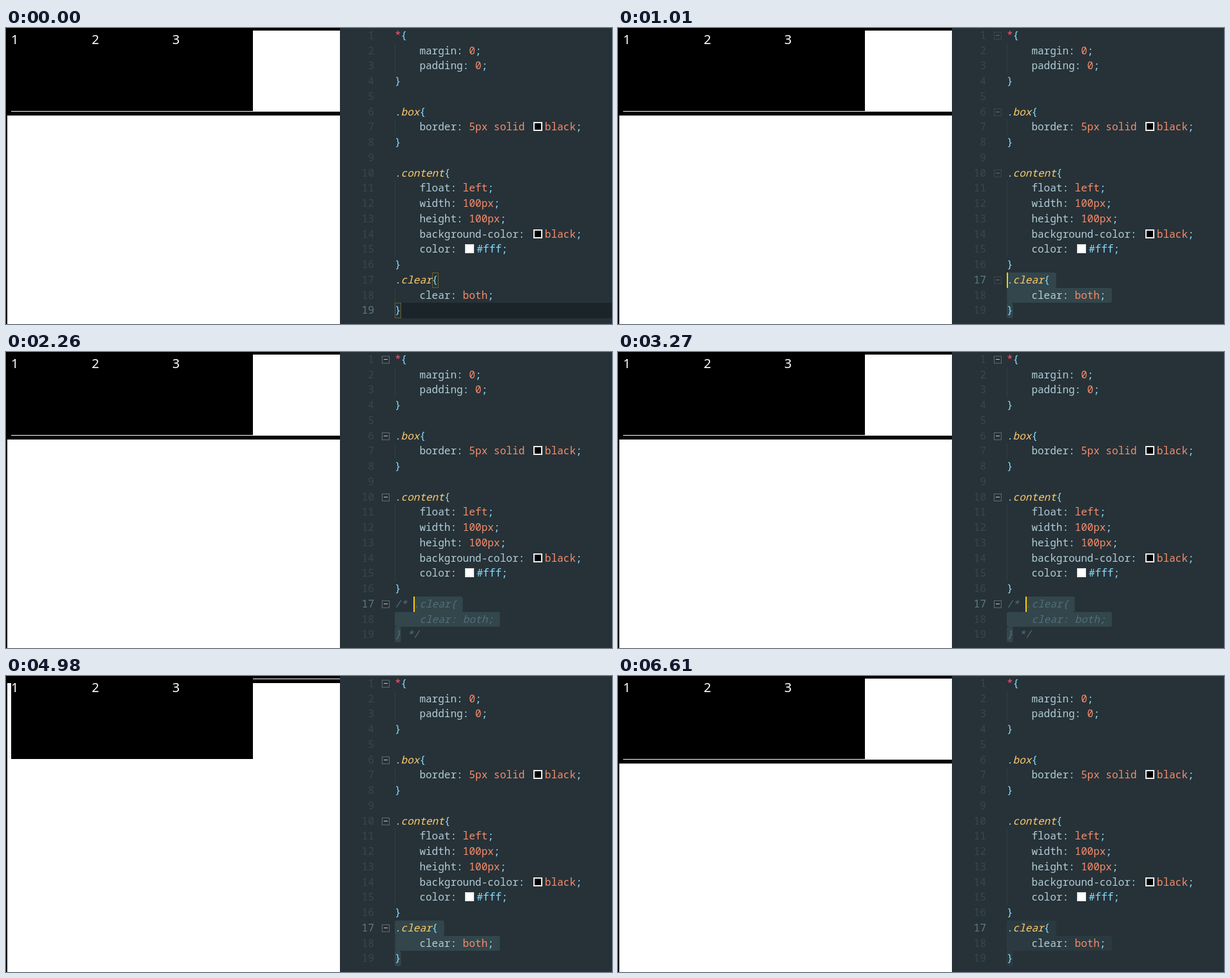
An HTML page with a canvas for the animation above (6750 ms loop, 940 by 460 pixels).

```html
<!DOCTYPE html>
<html lang="en">
<head>
<meta charset="utf-8">
<title>Clearing floats</title>
<style>
  html, body { margin: 0; width: 100%; height: 100%; overflow: hidden; background: #fff; }
  canvas { display: block; }
</style>
</head>
<body>
<canvas id="stage" width="940" height="460"></canvas>
<script>
const ctx = document.getElementById('stage').getContext('2d', { alpha: false });
const LOOP = 6750, LEFT = 603, CHAR = 9.6;
const MONO = '16px "Noto Sans Mono", "DejaVu Sans Mono", monospace';
const C = {
  bg: '#263238', punct: '#89ddff', star: '#ff5370', name: '#ffcb6b', prop: '#b2ccd6',
  value: '#f78c6c', comment: '#546e7a', num: '#37474f', active: '#607a86'
};
const HEAD = `*{
    margin: 0;
    padding: 0;
}

.box{
    border: 5px solid black;
}

.content{
    float: left;
    width: 100px;
    height: 100px;
    background-color: black;
    color: #fff;
}`.split('\n');
const RULE = ['.clear{', '    clear: both;', '}'];
const COMMENTED = ['/* .clear{', RULE[1], '} */'];

const rowY = row => Math.round(row * 23.74);
const colX = col => LEFT + col * CHAR;
const between = (t, a, b) => t >= a && t < b;

function rect(color, x, y, w, h) {
  ctx.fillStyle = color;
  ctx.fillRect(x, y, w, h);
}

function text(str, x, y, color, italic) {
  ctx.font = (italic ? 'italic ' : '') + MONO;
  ctx.fillStyle = color;
  ctx.fillText(str, x, y);
  return x + str.length * CHAR;
}

function swatch(x, row, color) {
  const y = rowY(row) + 4;
  rect('#eee', Math.round(x + 3.6), y, 14, 14);
  rect(color, Math.round(x + 3.6) + 2, y + 2, 10, 10);
  return x + 21.6;
}

function codeLine(line, row, isComment) {
  const y = rowY(row) + 17;
  if (isComment) return text(line, LEFT, y, C.comment, true);

  const selector = line.match(/^([*.])(\w*)\{/);
  if (selector) {
    const [, mark, name] = selector;
    let x = text(mark, LEFT, y, mark === '*' ? C.star : C.punct, mark === '.');
    x = text(name, x, y, C.name, true);
    return text('{', x, y, C.punct);
  }

  const rule = line.match(/^    (.+): (.+);/);
  if (!rule) return text(line, LEFT, y, C.punct);
  rect('#303d44', LEFT, rowY(row), 1, rowY(row + 1) - rowY(row));
  let x = text(rule[1], colX(4), y, C.prop);
  x = text(': ', x, y, C.punct);
  for (const part of rule[2].split(/(black|#fff)/)) {
    const isColor = part === 'black' || part === '#fff';
    if (isColor) x = swatch(x, row, part);
    x = text(part, x, y, part === '#fff' ? C.punct : C.value);
  }
  text(';', x, y, C.punct);
}

// Each range is [row, first column, last column].
function selection(ranges, alpha) {
  ctx.fillStyle = `rgba(128,203,196,${alpha})`;
  ctx.beginPath();
  for (const [row, from, to] of ranges) {
    ctx.roundRect(colX(from), rowY(row), (to - from) * CHAR, rowY(row + 1) - rowY(row), 3);
  }
  ctx.fill();
}

function bracketBox(row, col) {
  const x = Math.round(colX(col)), y = rowY(row), h = rowY(row + 1) - y;
  rect(C.bg, x, y, 10, h);
  ctx.strokeStyle = 'rgba(255,204,0,.31)';
  ctx.strokeRect(x + .5, y + .5, 9, h - 1);
}

function foldIcon(row) {
  const y = rowY(row) + 6;
  ctx.strokeStyle = '#5f6a70';
  ctx.strokeRect(583.5, y + .5, 11, 11);
  rect('#c5c5c5', 586, y + 5, 6, 1);
}

function page(cleared) {
  rect('#000', 0, 0, 518, 460);
  if (cleared) {
    rect('#fff', 383, 4, 135, 126);
    rect('#fff', 8, 129, 375, 1);
    rect('#fff', 2, 136, 516, 324);
  } else {
    rect('#fff', 383, 4, 135, 1);
    rect('#fff', 2, 11, 516, 449);
    rect('#000', 8, 0, 375, 129);
  }
  ctx.font = '20px "Noto Sans", "Open Sans", sans-serif';
  ctx.fillStyle = '#fff';
  [1, 2, 3].forEach((n, i) => ctx.fillText(n, 8 + i * 125, 25));
}

function editor(t) {
  rect(C.bg, 518, 0, 422, 460);
  const commented = between(t, 2260, 4440);
  const grey = between(t, 2260, 4520);
  const row = t < 790 ? 18 : t < 870 ? 17 : 16;
  const col = t < 790 ? 1 : t < 870 ? 4 : commented ? 3 : 0;

  if (t < 790) {
    rect('#1b2429', LEFT, rowY(18), 337, rowY(19) - rowY(18));
  } else {
    const ranges = [[17, row === 17 ? 4 : 0, 17], [18, 0, 1]];
    if (row === 16) ranges.push([16, col, commented ? 11 : 8]);
    selection(ranges, t < 6610 ? .13 : .055);
  }
  if (t < 870) {
    bracketBox(16, 6);
    bracketBox(18, 0);
  }

  const lines = HEAD.concat(commented ? COMMENTED : RULE);
  lines.forEach((line, i) => {
    const label = String(i + 1);
    text(label, 571 - label.length * CHAR, rowY(i) + 17, i === row ? C.active : C.num);
    codeLine(line, i, grey && i > 15);
  });

  // The fold markers follow the pointer in and out of the gutter.
  const fade = Math.min((t - 830) / 480, (6520 - t) / 520, 1);
  if (fade > 0) {
    ctx.globalAlpha = fade;
    [0, 5, 9, 16].forEach(foldIcon);
    ctx.globalAlpha = 1;
  }

  const cursorOn = [[470, 1560], [2030, 2720], [3270, 3740], [4290, 4980], [5440, 5980], [6450, 6610]];
  if (cursorOn.some(([a, b]) => between(t, a, b))) {
    rect('#ffcc00', Math.round(colX(col)), rowY(row), 2, rowY(row + 1) - rowY(row));
  }
}

const start = performance.now();
function draw() {
  const t = (performance.now() - start) % LOOP;
  page(!between(t, 3420, 5590));
  editor(t);
  requestAnimationFrame(draw);
}
draw();
</script>
</body>
</html>
```
